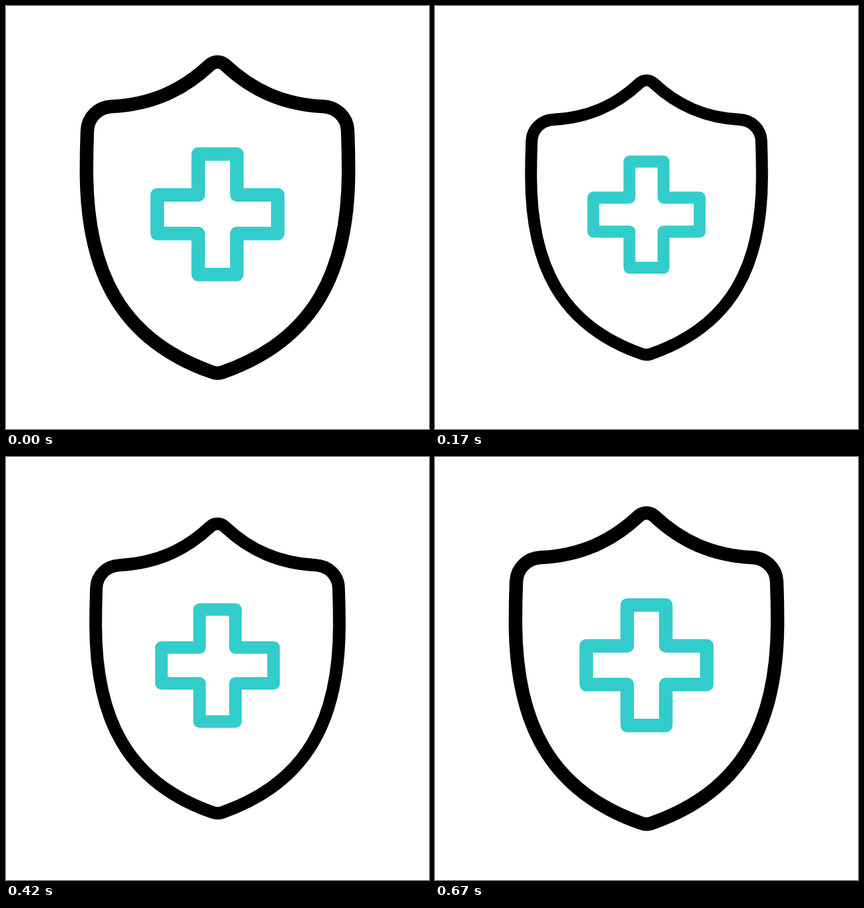
Recreate the animation shown at these times as an HTML page. Size 640 px wide and 640 px high, loop 1.54 s.

```html
<!DOCTYPE html>
<html>
<head>
<meta charset="utf-8">
<style>
  html, body { margin: 0; width: 100%; height: 100%; overflow: hidden; background: #fff; }
  svg { display: block; width: 100%; height: 100%; }
</style>
</head>
<body>
<svg viewBox="0 0 640 640">
  <g id="icon" fill="none" stroke-width="20.5" stroke-linejoin="round">
    <path stroke="#000" d="M308 89.5C315 83 325 83 332 89.5C373 128 420 149 480 152
      C500 153 516 168 517 188Q518.2 218 518.2 250C518 400 468 505 328 554Q320 557 312 554
      C172 505 122 400 121.8 250Q121.8 218 123 188C124 168 140 153 160 152C220 149 267 128 308 89.5Z"/>
    <path stroke="#3cc" d="M290.8 224H349.2V285.8H411.2V344.2H349.2V406.2H290.8V344.2H228.8V285.8H290.8Z"/>
  </g>
</svg>
<script>
const LOOP = 1540, FPS = 24, LAST = 16;
const icon = document.getElementById('icon');

// Start time of a step, on a 10 ms grid
const startOf = n => Math.round(n * 100 / FPS) * 10;

// Fast away from full size, slow around the lowest point, fast back
function dip(n, from, low, to, depth) {
  const x = n < low ? (low - n) / (low - from) : (n - low) / (to - low);
  return depth * (1 - x ** 2.6);
}

function scaleAt(t) {
  let n = 0;
  while (n < LAST && startOf(n + 1) <= t) n++;
  return 1 - (n < 12 ? dip(n, 0, 5, 12, 0.12) : dip(n, 12, 14, 16, 0.051));
}

const t0 = performance.now();
function draw() {
  const s = scaleAt((performance.now() - t0) % LOOP);
  icon.setAttribute('transform', `translate(320 320) scale(${s}) translate(-320 -320)`);
  requestAnimationFrame(draw);
}
draw();
</script>
</body>
</html>
```
